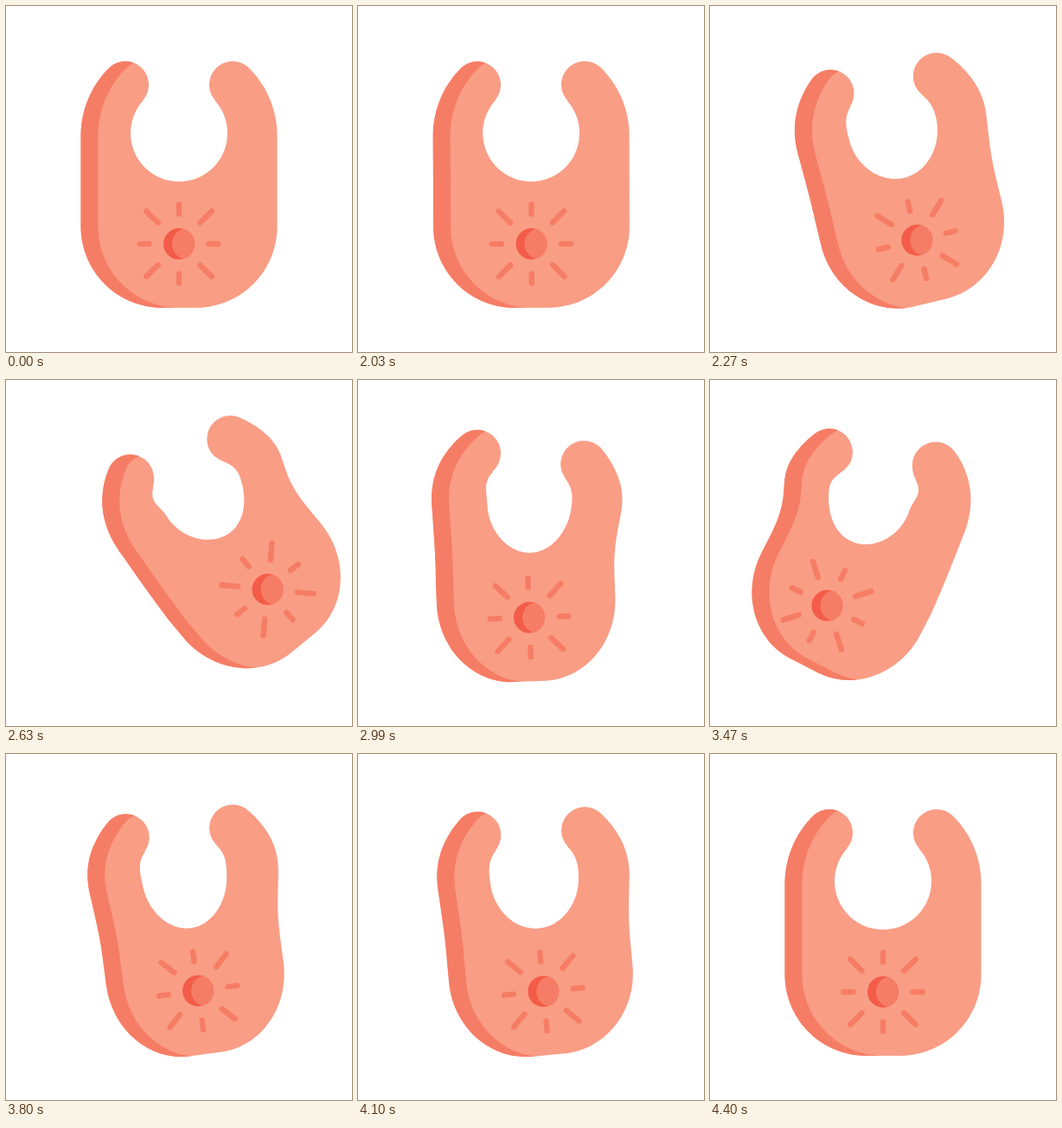
An HTML page with a canvas that plays this animation: 400 by 400 pixels, repeating every 4.43 s.

```html
<!DOCTYPE html>
<html lang="en">
<head>
<meta charset="utf-8">
<title>Swinging bib</title>
<style>
  html, body { margin: 0; width: 100%; height: 100%; overflow: hidden; background: #fff; }
  canvas { display: block; width: 400px; height: 400px; }
</style>
</head>
<body>
<canvas id="stage" width="400" height="400"></canvas>
<script>
const ctx = document.getElementById('stage').getContext('2d');
const LOOP = 4430, REST = 2000, BEAT = 600;
const LIGHT = '#f99d85', MID = '#f67d65', DEEP = '#f35c48';
const RAD = Math.PI / 180;

// Tilt in degrees at the end of each beat
const NECK = [0, -21.5, 16, -5, 0];
const BODY = [0, -40, 36.5, -9, 0];

const smooth = v => { v = Math.min(1, Math.max(0, v)); return v * v * (3 - 2 * v); };
const mirror = pts => pts.map(([x, y]) => [400 - x, y]).reverse();

function range(n, fn) {
  return Array.from({ length: n + 1 }, (_, i) => fn(i / n));
}

function arc(cx, cy, r, from, to) {
  return range(30, u => {
    const a = (from + (to - from) * u) * RAD;
    return [cx + r * Math.cos(a), cy + r * Math.sin(a)];
  });
}

function rotate(x, y, deg) {
  const c = Math.cos(deg * RAD), s = Math.sin(deg * RAD);
  return [x * c - y * s, x * s + y * c];
}

// Left half: hem corner, straight side, shoulder, horn, then the neck hole
const side = range(20, u => [86.5, 255 - 105 * u]);
const outer = [
  ...arc(180.3, 255, 93.8, 90, 180), ...side,
  ...arc(196.8, 150, 110.3, 180, 225), ...arc(138, 91, 27, 225, 270)
];
const horn = arc(138, 91, 27, 270, 402);
const hole = arc(200, 147, 56, 222, 90);
const rim = mirror(outer).concat(outer);
const neckline = hole.concat(mirror(hole));

function tilt(peaks, beat) {
  const b = Math.min(peaks.length - 1, Math.max(0, beat));
  const i = Math.min(peaks.length - 2, Math.floor(b));
  const ease = (1 - Math.cos(Math.PI * (b - i))) / 2;
  return peaks[i] + (peaks[i + 1] - peaks[i]) * ease;
}

// The neck turns first, the body hangs from it and follows late
function makePose(t) {
  const beat = Math.max(0, (t - REST) / BEAT);
  const lag = .16 * Math.sin(Math.PI * Math.min(beat, 4) / 4);
  const a = tilt(NECK, beat), b = tilt(BODY, beat - lag);
  const bend = b - a;
  const squeeze = smooth(beat / .8) * smooth((4 - beat) / .8);

  const upper = (x, y) => {
    const [rx, ry] = rotate(x - 200, y - 87, a);
    return [200 + rx, 87 + ry];
  };
  const joint = upper(200, 150);
  const lower = (x, y) => {
    const [rx, ry] = rotate(x - 200, y - 150, b);
    return [joint[0] + rx, joint[1] + ry];
  };
  const skin = (x, y) => {
    const mix = smooth((y - 75) / 150);
    const p = upper(x, y), q = lower(x, y);
    return p.map((v, i) => v + (q[i] - v) * mix);
  };
  const narrow = y => 1 - .09 * squeeze * smooth((y - 100) / 120);
  const drift = y => bend * (.55 * smooth((y - 150) / 80) - .15 * smooth((y - 63) / 87));

  const cloth = ([x, y]) => skin(200 + (x - 200) * narrow(y) + drift(y), y);
  const opening = ([x, y]) => {
    const k = smooth((y - 109) / 40);
    const scale = narrow(y) * (1 - .1 * squeeze * k);
    const shift = drift(Math.min(y, 150)) - .4 * bend * k;
    return skin(200 + (x - 200) * scale + shift, y - .35 * Math.abs(bend) * k);
  };
  return { cloth, opening, sun: lower(200, 275), turn: b };
}

function shape(pts) {
  const path = new Path2D();
  pts.forEach(([x, y]) => path.lineTo(x, y));
  path.closePath();
  return path;
}

function drawBib({ cloth, opening }) {
  const edge = rim.map(cloth);
  const bib = shape([
    ...edge, ...horn.map(cloth), ...neckline.map(opening), ...mirror(horn).map(cloth)
  ]);
  ctx.fillStyle = LIGHT;
  ctx.fill(bib);

  // Shade whatever lies outside the outer edge moved 20px to the right
  const front = edge.map(([x, y]) => [x + 20, y]);
  const first = front[0], last = front[front.length - 1];
  const shade = shape([[first[0], -50], ...front, [last[0], -50]]);
  shade.rect(-100, -50, 700, 600);
  ctx.save();
  ctx.clip(bib);
  ctx.fillStyle = MID;
  ctx.fill(shade, 'evenodd');
  ctx.restore();
}

function disc(x, color) {
  ctx.beginPath();
  ctx.arc(x, 0, 18, 0, 2 * Math.PI);
  ctx.fillStyle = color;
  ctx.fill();
}

function drawSun([x, y], turn) {
  ctx.save();
  ctx.translate(x, y);

  ctx.save();
  disc(0, DEEP);
  ctx.clip();
  disc(10, MID);
  ctx.restore();

  ctx.rotate(turn * RAD);
  ctx.strokeStyle = MID;
  ctx.lineWidth = 6.4;
  ctx.lineCap = 'round';
  ctx.beginPath();
  for (let i = 0; i < 8; i++) {
    ctx.moveTo(0, -34.5);
    ctx.lineTo(0, i % 2 ? -53.5 : -45.5);
    ctx.rotate(45 * RAD);
  }
  ctx.stroke();
  ctx.restore();
}

function draw(t) {
  const pose = makePose(t);
  ctx.fillStyle = '#fff';
  ctx.fillRect(0, 0, 400, 400);
  drawBib(pose);
  drawSun(pose.sun, pose.turn);
}

const start = performance.now();
function tick() {
  draw((performance.now() - start) % LOOP);
  requestAnimationFrame(tick);
}
tick();
</script>
</body>
</html>
```
